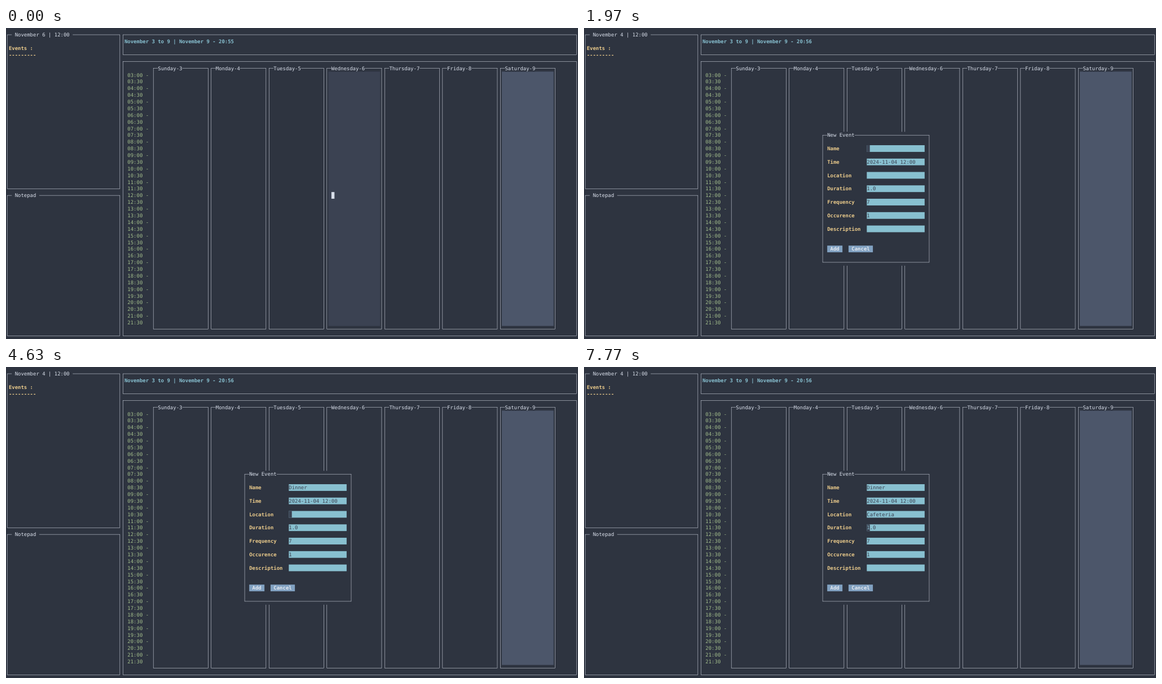
These frames come from a looping animation (1014x552 px, 8 s). An HTML page:

```html
<!DOCTYPE html>
<html lang="en">
<head>
<meta charset="utf-8">
<title>Calendar</title>
<style>
  html, body { margin: 0; width: 100%; height: 100%; overflow: hidden; background: #2e3440; }
  svg { display: block; width: 1014px; height: 552px; }
  text {
    font: 8.965px "DejaVu Sans Mono", "Noto Sans Mono", monospace;
    white-space: pre;
    text-rendering: geometricPrecision;
  }
  .bold { font-weight: bold; }
</style>
</head>
<body>
<svg id="stage" viewBox="0 0 1014 552"></svg>
<script>
const BG = '#2e3440', DARK = '#3b4252', GREY = '#4c566a', FG = '#d8dee9';
const CYAN = '#88c0d0', BLUE = '#81a1c1', GREEN = '#a3be8c', YELLOW = '#ebcb8b';
const LOOP = 8000;
const DAYS = ['Sunday', 'Monday', 'Tuesday', 'Wednesday', 'Thursday', 'Friday', 'Saturday'];

// Terminal grid: left edge of a column, middle of a row
const CW = 5.396, RH = 11.88, LINE = 0.54;
const colX = c => c * CW - 0.5;
const rowY = r => 12 + r * RH;
const lineX = c => colX(c + 0.5);

const stage = document.getElementById('stage');

function add(parent, tag, attrs, content) {
  const el = document.createElementNS('http://www.w3.org/2000/svg', tag);
  for (const key in attrs) el.setAttribute(key, attrs[key]);
  if (content !== undefined) el.textContent = content;
  parent.appendChild(el);
  return el;
}

function group(parent = stage) {
  return add(parent, 'g', {});
}

function fill(parent, col, row, cols, rows, color) {
  return add(parent, 'rect', {
    x: colX(col), y: rowY(row - 0.5), width: cols * CW, height: rows * RH, fill: color
  });
}

function write(parent, col, row, str, color, bold) {
  return add(parent, 'text', {
    x: colX(col), y: rowY(row) + 3.24, fill: color, class: bold ? 'bold' : ''
  }, str);
}

function box(parent, c1, r1, c2, r2, title = '') {
  const x = lineX(c1), y = rowY(r1);
  add(parent, 'rect', {
    x, y, width: lineX(c2) - x, height: rowY(r2) - y,
    fill: 'none', stroke: FG, 'stroke-width': LINE
  });
  if (!title) return null;
  fill(parent, c1 + 2, r1, title.length, 1, BG);
  return write(parent, c1 + 2, r1, title, FG);
}

// Side panels and header
const panelTitle = box(stage, 0, 0, 37, 23, ' November 6 | 12:00 ');
write(stage, 1, 2, 'Events :', YELLOW, true);
write(stage, 1, 3, '---------', YELLOW, true);
box(stage, 0, 24, 37, 45, ' Notepad ');
box(stage, 38, 0, 187, 3);
const header = write(stage, 39, 1, '', CYAN, true);

// Week view
box(stage, 38, 4, 187, 45);
for (let i = 0; i < 38; i++) {
  const hour = String(3 + (i >> 1)).padStart(2, '0');
  write(stage, 40, 6 + i, hour + (i % 2 ? ':30' : ':00 -'), GREEN);
}
const dayCol = i => 48 + 19 * i;
fill(stage, dayCol(6) + 1, 6, 17, 38, GREY);
const shade = group();
fill(shade, dayCol(0) + 1, 6, 17, 38, DARK);
fill(shade, dayCol(0) + 2, 24, 1, 1, FG);
DAYS.forEach((name, i) => box(stage, dayCol(i), 5, dayCol(i) + 18, 44, `${name}-${i + 3}`));

// New event form
const form = group();
fill(form, 78, 15, 36, 20, BG);
box(form, 78, 15, 113, 34, 'New Event');
const FIELDS = ['Name', 'Time', 'Location', 'Duration', 'Frequency', 'Occurence', 'Description'];
FIELDS.forEach((label, i) => write(form, 80, 17 + 2 * i, label, YELLOW, true));
[[80, ' Add '], [87, ' Cancel ']].forEach(([col, label]) => {
  fill(form, col, 32, label.length, 1, BLUE);
  write(form, col, 32, label, '#e5e9f0', true);
});
const inputs = group(form);

function drawInputs({ name, place, focus }) {
  inputs.replaceChildren();
  const values = [name, '2024-11-04 12:00', place, '1.0', '7', '1', ''];
  values.forEach((value, i) => {
    const row = 17 + 2 * i;
    fill(inputs, 93, row, 19, 1, CYAN);
    write(inputs, 93, row, value, DARK);
    if (i !== focus) return;
    const pos = i < 3 ? value.length : 0;
    fill(inputs, 93 + pos, row, 1, 1, DARK);
    write(inputs, 93 + pos, row, value.charAt(pos), CYAN);
  });
}

// Each step changes part of the state from its time on
const STEPS = [
  [0, { day: 3, open: false, clock: '20:55', name: '', place: '', focus: 0 }],
  [1070, { day: 2 }],
  [1230, { day: 1 }],
  [1970, { open: true, clock: '20:56' }],
  [2700, { name: 'D' }],
  [3070, { name: 'Di' }],
  [3270, { name: 'Din' }],
  [3370, { name: 'Dinn' }],
  [3530, { name: 'Dinne' }],
  [3700, { name: 'Dinner' }],
  [4630, { focus: 2 }],
  [6200, { place: 'C' }],
  [6630, { place: 'Cafe' }],
  [6970, { place: 'Cafete' }],
  [7330, { place: 'Cafeteri' }],
  [7770, { place: 'Cafeteria', focus: 3 }]
];

function draw(count) {
  const state = Object.assign({}, ...STEPS.slice(0, count).map(step => step[1]));
  panelTitle.textContent = ` November ${state.day + 3} | 12:00 `;
  header.textContent = `November 3 to 9 | November 9 - ${state.clock}`;
  shade.setAttribute('transform', `translate(${state.day * 19 * CW} 0)`);
  shade.style.display = state.open ? 'none' : '';
  form.style.display = state.open ? '' : 'none';
  if (state.open) drawInputs(state);
}

const start = performance.now();
let shown = 0;
function tick(now) {
  const t = Math.max(0, now - start) % LOOP;
  const count = STEPS.filter(step => step[0] <= t).length;
  if (count !== shown) draw(shown = count);
  requestAnimationFrame(tick);
}
tick(start);
</script>
</body>
</html>
```
